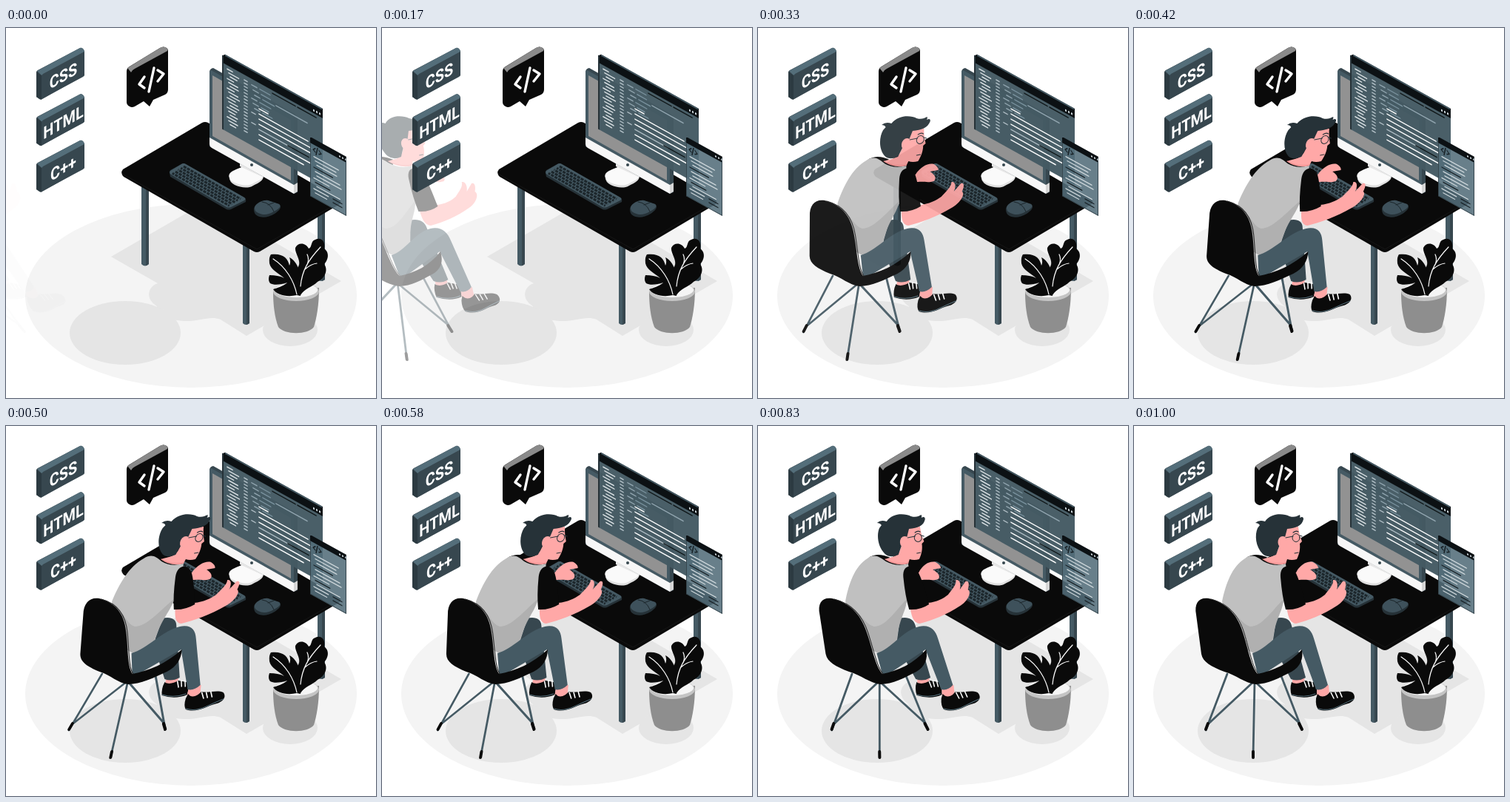
An HTML page that plays this animation: 500x500 px, repeating every 1.04 s.

```html
<!DOCTYPE html>
<html lang="en">
<head>
<meta charset="utf-8">
<title>Programmer at a desk</title>
<style>
  html, body { margin: 0; height: 100%; overflow: hidden; background: #fff; }
  svg { display: block; width: 100vw; height: 100vh; }
  text { font: 700 23px Roboto, Arial, sans-serif; fill: #fff; text-anchor: middle; }
  .line { fill: none; stroke-linecap: round; stroke-linejoin: round; }
</style>
</head>
<body>
<svg viewBox="0 0 500 500">
  <g id="floor">
    <ellipse cx="250" cy="362" rx="224" ry="124" fill="#f4f4f4"/>
    <g fill="#e5e5e5">
      <path d="M142 309L270 235 453 342 325 416 290 394C275 388 262 397 240 396C215 394 201 386 204 376C188 366 191 350 205 345Z"/>
      <ellipse cx="161" cy="412" rx="75" ry="43"/>
      <ellipse cx="384" cy="408" rx="37" ry="22"/>
    </g>
  </g>

  <g id="desk">
    <g fill="#455a64">
      <path d="M183 210h10v109q-5 5-10 0zM320 290h9v109q-5 4-9 0zM421 245h10v95q-5 4-10 0z"/>
      <path d="M189 210h4v109l-4 2zM325 290h4v109l-4 2zM427 245h4v95l-4 2z" fill="#37474f"/>
    </g>
    <path d="M158 191L265 128Q269 126 273 128L450 231Q454 234 451 238L343 302Q339 304 335 302L159 201Q154 196 158 191Z" fill="#0a0a0a"/>
    <path d="M157 197L339 299 451 235" fill="none" stroke="#161616"/>
  </g>

  <g id="monitor">
    <path d="M302 203C300 198 304 195 311 192L321 187 348 200C348 206 342 209 334 213C328 217 317 216 309 212Q302 208 302 203Z" fill="#e0e0e0"/>
    <path d="M302 202C300 197 304 194 311 191L321 187 348 199C347 204 342 206 334 210C328 214 317 213 309 209Q302 206 302 202Z" fill="#fafafa"/>
    <path d="M316 178L346 194V201L316 187Z" fill="#e6e6e6"/>
    <path d="M275 60Q275 55 280 54L390 116Q394 119 394 124V222L389 224 275 160Z" fill="#37474f"/>
    <path d="M275 60Q275 56 279 58L386 118Q389 121 389 125V212L275 148Z" fill="#455a64"/>
    <path d="M279 64L385 124V206L279 146Z" fill="#929292"/>
    <path d="M275 148L389 212V224L278 162Q275 160 275 157Z" fill="#f7f7f7"/>
    <path d="M389 212L394 209V221L389 224Z" fill="#d6d6d6"/>
    <circle cx="332" cy="185" r="2" fill="#37474f"/>
  </g>

  <g transform="matrix(1 .556 0 1 293 37)">
    <path d="M0 0H135V100H0Z" fill="#455a64" opacity=".97"/>
    <path d="M0 0L3-3H135V10H0Z" fill="#0c1114"/>
    <path d="M0 0V100" stroke="#263238" stroke-width="2"/>
    <path d="M3-2H134" stroke="#455a64" stroke-width="2"/>
    <path d="M122 6h2m2 0h2m2 0h2" stroke="#cfd8dc" stroke-width="2.6"/>
    <g id="code" class="line" stroke-width="1.6"/>
  </g>
  <g transform="matrix(1 .55 0 1 411 148)">
    <path d="M0 0H49V79H0Z" fill="#546e7a" opacity=".88"/>
    <path d="M0 0L2-1H49V7H0Z" fill="#0c1114"/>
    <path d="M.5 7V78.500H48.500V0" fill="none" stroke="#37474f"/>
    <path d="M39 3.500h2m2 0h2m2 0h1.500" stroke="#cfd8dc" stroke-width="2"/>
    <path class="line" d="M7 11L4 14 7 16M10 9L8 19M12 11L15 14 12 16" stroke="#182126" stroke-width="1.400"/>
    <g id="panel" class="line" stroke-width="1.400"/>
  </g>

  <g id="input">
    <path d="M221 196Q220 193 224 191L237 184Q240 182 243 184L322 229Q325 231 324 235L304 245Q301 246 298 245L222 201Z" fill="#263238"/>
    <path d="M222 193L237 184Q240 182 243 184L322 229Q325 231 322 233L304 242Q301 243 298 242L223 198Q220 196 222 193Z" fill="#455a64"/>
    <g id="keys" fill="none" stroke="#1c262b" stroke-width="3"/>
    <path d="M335 246C334 239 346 232 354 233L369 238C374 242 369 247 363 251C355 256 346 257 340 254Q335 251 335 246Z" fill="#263238"/>
    <path d="M336 242C338 237 347 232 354 233L369 238C373 241 368 245 362 248C354 253 347 253 341 250Q335 247 336 242Z" fill="#3e515b"/>
    <path class="line" d="M346 235Q357 236 362 248M354 239L362 236" stroke="#1c262b"/>
  </g>

  <g id="plant">
    <path d="M361 357L423 351C423 374 420 391 416 404C408 415 376 415 368 404C363 391 361 374 361 357Z" fill="#8e8e8e"/>
    <ellipse cx="392" cy="356" rx="31" ry="13" fill="#c4c4c4"/>
    <ellipse cx="392" cy="354" rx="29" ry="10" fill="#f5f5f5"/>
    <path d="M398 361C392 345 396 334 394 324C401 316 390 305 391 297C395 289 405 290 409 298C414 297 411 288 418 286C426 282 432 289 430 298C438 304 435 314 430 319C437 329 428 340 421 343C414 350 403 352 398 361Z" fill="#0a0a0a"/>
    <path d="M393 361C380 364 366 361 361 353C371 350 377 347 380 344C371 347 362 348 357 345C354 341 355 337 356 334C364 334 370 335 376 338C368 331 358 327 356 318Q355 310 358 306C374 304 381 311 383 321C385 317 384 313 383 310C395 316 400 334 395 343C397 349 398 356 398 362Z" fill="#0a0a0a"/>
    <path class="line" d="M361 312C378 323 389 341 393 360M425 296C409 313 400 327 398 349M407 306Q410 312 407 320M420 318Q412 319 404 326" stroke="#fff" stroke-width="1.200"/>
  </g>

  <g id="man">
    <g class="line">
      <path d="M126 335L97 411M163 345L161 447M199 338L227 410M101 402L160 347M165 347L224 402" stroke="#455a64" stroke-width="2.800"/>
      <path d="M100 402L97 410M161 440V448M223 402L227 410" stroke="#0a0a0a" stroke-width="4"/>
    </g>

    <path d="M214 337L230 338 231 350Q222 355 214 347Z" fill="#ffa8a7"/>
    <path d="M213 346C219 350 226 347 231 344L247 347V363Q232 370 213 364Q210 355 213 346Z" fill="#0a0a0a"/>
    <path class="line" d="M230 345l3 8M235 344l2 8M240 344l2 8" stroke="#fff" stroke-width="1.500"/>
    <path class="line" d="M213 363Q230 368 245 362" stroke="#546e7a"/>
    <path d="M184 263C197 256 211 258 213 270L232 340Q222 346 212 342L190 300Z" fill="#37474f"/>

    <path d="M147 184C153 173 166 171 181 178L178 190Z" fill="#0a0a0a"/>
    <path d="M219 198C225 187 234 182 242 184Q249 188 249 192L238 194C245 198 249 203 245 207C236 210 231 206 218 209L205 215 205 204Z" fill="#ffa8a7"/>
    <path d="M150 179C160 172 166 177 175 183C184 188 194 189 205 186C207 205 211 228 197 247C191 260 190 280 187 294L163 307C145 300 130 285 126 265L119 237C124 214 132 190 150 179Z" fill="#c0c0c0"/>
    <path d="M120 239C137 249 144 267 157 271C173 271 186 250 202 234C202 250 190 260 187 294L163 307C143 300 130 283 126 265Z" fill="#b0b0b0"/>

    <path d="M247 351L263 350 264 362Q256 372 247 364Z" fill="#ffa8a7"/>
    <path d="M248 362C254 369 262 364 265 359C276 361 286 356 295 360C302 367 296 374 286 376C276 379 265 388 249 383Q245 378 246 368Z" fill="#0a0a0a"/>
    <path class="line" d="M266 360l4 8M272 360l3 7M278 359l3 7" stroke="#fff" stroke-width="1.600"/>
    <path class="line" d="M249 382Q262 386 276 379T297 369" stroke="#546e7a"/>
    <path d="M160 307C179 302 196 276 218 271C233 268 240 276 243 287L262 350Q255 358 246 356L226 302 168 340Z" fill="#455a64"/>

    <path d="M84 255C81 239 88 231 101 233C122 238 139 252 147 279C154 300 158 325 167 335C188 331 210 321 227 302C229 315 225 325 213 332C197 340 181 349 164 349C149 347 139 337 122 332C104 325 93 319 91 308Z" fill="#0a0a0a"/>
    <path class="line" d="M104 234C124 239 141 253 149 280C156 303 160 326 168 335" stroke="#252525"/>

    <path d="M206 244L231 239C242 238 252 233 258 228C263 221 270 215 269 208C275 207 276 215 274 221L282 210C287 208 287 215 285 221C291 225 283 238 274 243C256 255 235 263 219 267C209 266 208 254 206 244Z" fill="#ffa8a7"/>
    <path d="M198 204C197 187 211 185 219 199C225 212 228 226 232 241Q220 249 205 248Q200 230 198 204Z" fill="#0a0a0a"/>

    <path d="M204 138L222 136C223 145 225 150 227 156L224 159C225 167 223 174 220 180Q213 182 207 180L205 186C195 189 181 186 174 180C181 177 189 178 194 169Z" fill="#ffa8a7"/>
    <path d="M174 173C164 163 163 147 167 138L170 134Q168 131 164 131Q169 126 177 129C185 117 202 118 210 122C217 124 220 122 224 120Q225 122 224 124Q229 121 229 126C227 135 219 138 207 139L203 154 196 163 192 174Q181 179 174 173Z" fill="#263238"/>
    <ellipse cx="201" cy="157" rx="6.500" ry="8" fill="#ffa8a7"/>
    <path class="line" d="M174 180Q188 188 205 185" stroke="#f28f8f"/>
    <path class="line" d="M205 151L215 149M224 148L227 149M215 144Q219 141 222 143M217 172L222 171" stroke="#263238" stroke-width="1.200"/>
    <ellipse class="line" cx="219" cy="151" rx="5" ry="5.500" stroke="#263238"/>
  </g>

  <g id="badges"></g>

  <g id="bubble">
    <path d="M163 59Q163 54 167 52L208 27Q213 24 217 27Q219 28 219 32V83Q219 88 215 90L199 97 194 106 186 99 174 106Q170 108 167 106Q163 104 163 100Z" fill="#0a0a0a"/>
    <path d="M164 54L208 27Q213 24 217 27Q219 29 218 31L174 55Q170 57 169 60Z" fill="#8a8a8a"/>
    <path class="line" d="M187 66L180 76 187 81M200 54L193 86M205 57L213 62 205 72" stroke="#fff" stroke-width="3.400"/>
  </g>
</svg>

<script>
const $ = id => document.getElementById(id);
const line = (x, y, w, color) => `<path d="M${x} ${y}h${w}" stroke="${color}"/>`;

let seed = 7;
const rand = () => (seed = seed * 16807 % 2147483647) / 2147483647;

// Editor window: file tree, line numbers, code
let code = '';
for (let i = 0; i < 18; i++) {
  const y = 15 + i * 4.3;
  code += line(6 + i % 3 * 2, y, 7 + rand() * 7, '#dce2e5');
  if (i < 17) code += line(29, y + 2, 4, '#b0bec5');
}
for (let i = 0; i < 6; i++) {
  const y = 18 + i * 6, indent = i % 3 * 2;
  code += line(39 + indent, y, 7, '#90a4ae') + line(50 + indent, y, 9 + rand() * 7, '#78909c');
}
code += line(67, 14, 31, '#101719') + line(101, 14, 25, '#101719') + line(72, 28, 42, '#90a4ae');
[12, 66, 72, 69, 44, 70, 60].forEach((w, i) => {
  code += line(49, 45 + i * 7, w, i == 4 ? '#b0bec5' : '#fff');
});
code += line(39, 55, 5, '#b0bec5') + line(39, 69, 5, '#b0bec5') + line(88, 73, 28, '#101719');
$('code').innerHTML = code;

let panel = '';
for (let i = 0; i < 11; i++) {
  panel += line(5 + i % 3 * 2, 23 + i * 4.8, 12 + rand() * 23, i % 4 == 3 ? '#182126' : '#cfd8dc');
}
$('panel').innerHTML = panel + line(31, 66, 12, '#182126') + line(31, 71, 12, '#182126');

let keys = '';
for (let i = 0; i < 5; i++) {
  const x = 240 - i * 3.8, y = 187 + i * 2.3;
  keys += `<path d="M${x} ${y}l77 44" stroke-dasharray="4.2 1.3" stroke-dashoffset="${i * 1.7}"/>`;
}
$('keys').innerHTML = keys;

$('badges').innerHTML = ['CSS', 'HTML', 'C++'].map((label, i) => `
  <g transform="translate(0 ${i * 62.5})">
    <path d="M41 60Q41 58 43 57L100 27Q102 26 104 28L106 31V64L49 96Q47 97 45 96L41 93Z" fill="#37474f"/>
    <path d="M42 58L100 27Q102 26 105 29L106 32 48 64Z" fill="#546e7a"/>
    <path d="M48 66Q48 64 50 62L106 32V63Q106 65 104 66L48 96Z" fill="#37474f"/>
    <path d="M41 59L48 64V97L41 93Z" fill="#2c3a41"/>
    <text transform="matrix(.866 -.5 0 1 77.500 72.500)">${label}</text>
  </g>`).join('');

const bezier = (a, b, s) => 3 * a * s * (1 - s) ** 2 + 3 * b * s * s * (1 - s) + s ** 3;

// cubic-bezier(.36, -.01, .5, 1.38), solved by bisection
function ease(x) {
  if (x <= 0 || x >= 1) return x <= 0 ? 0 : 1;
  let lo = 0, hi = 1;
  for (let i = 0; i < 24; i++) {
    const mid = (lo + hi) / 2;
    if (bezier(.36, .5, mid) < x) lo = mid; else hi = mid;
  }
  return bezier(-.01, 1.38, lo);
}

const LOOP = 1040, FPS = 24, LEAD = 35, PIVOT = 284;

function pose(ms) {
  let shift = 0, skew, alpha = 1;
  if (ms < 600) {
    const p = ease(ms / 600);
    shift = -250 * (1 - p);
    skew = 20 - 30 * p;
    alpha = Math.min(1, Math.max(0, p));
  } else if (ms < 800) {
    skew = -10 + 12 * ease((ms - 600) / 200);
  } else {
    skew = 2 - 2 * ease((ms - 800) / 200);
  }
  $('man').setAttribute('transform', `translate(${shift} ${PIVOT}) skewX(${skew}) translate(0 ${-PIVOT})`);
  $('man').setAttribute('opacity', alpha);
}

const start = performance.now();
function tick() {
  const t = (performance.now() - start) % LOOP;
  const step = Math.min(24, Math.floor((t + 4) * FPS / 1000));
  pose(step * 1000 / FPS + LEAD);
  requestAnimationFrame(tick);
}
tick();
</script>
</body>
</html>
```
